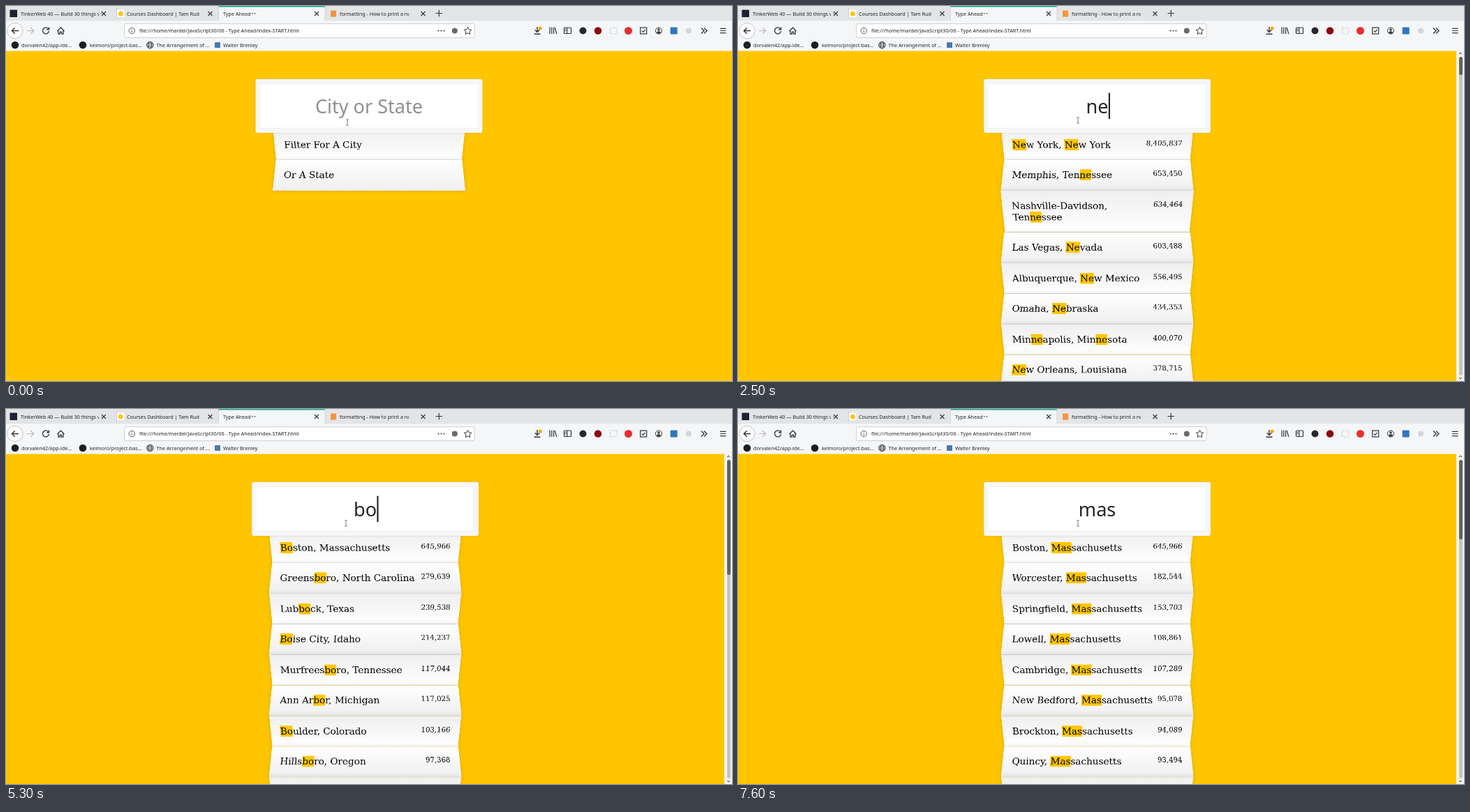
Write an HTML page that moves like this. It is 1040x538 px and loops after 8000 ms.

```html
<!DOCTYPE html>
<html lang="en">
<head>
<meta charset="utf-8">
<title>Type Ahead</title>
<style>
  html, body { margin: 0; width: 100%; height: 100%; overflow: hidden; }
  #stage { position: relative; width: 1040px; height: 538px; overflow: hidden; background: #ffc600; }
  #chrome { position: absolute; left: 0; top: 0; font: 7.22px "Noto Sans", "Open Sans", sans-serif; }

  /* The page is laid out for a 1920px screen and scaled down to the stage. */
  #page { position: absolute; left: 0; top: 64.46px; width: 1920px; transform: scale(.541667); transform-origin: 0 0; }
  #page.scrolls { width: 1900px; }
  .form { position: relative; width: 500px; margin: 62.5px auto; }
  .search {
    position: relative; left: -50px; top: 12.5px; z-index: 2; box-sizing: border-box;
    width: 600px; height: 143px; padding: 25px; border: 12px solid #f7f7f7; border-radius: 6px;
    background: #fff; color: #232629; text-align: center; white-space: nowrap;
    font: 50px/70px "Noto Sans", "Open Sans", sans-serif;
    box-shadow: 0 0 6px rgba(0,0,0,.12), inset 0 0 2.5px rgba(0,0,0,.19);
  }
  .field { position: relative; display: inline-block; }
  .empty { color: #8f9091; }
  #caret { position: absolute; left: 100%; top: 0; width: 4px; height: 69px; background: #232629; }
  .empty + #caret { left: 50%; }
  ul { position: relative; margin: 0; padding: 0; }
  li {
    display: flex; justify-content: space-between; list-style: none; padding: 25px;
    border-bottom: 1px solid #d8d8d8; box-shadow: 0 0 12.5px rgba(0,0,0,.14);
    font: 25px/30px "DejaVu Serif", "Noto Serif", serif; color: #000;
  }
  li:nth-child(odd) {
    transform: perspective(125px) rotateX(-3deg) translateY(3.75px);
    background: linear-gradient(to top, #fff, #efefef);
  }
  li:nth-child(even) {
    transform: perspective(125px) rotateX(3deg) translateY(2.5px) scale(1.001);
    background: linear-gradient(to bottom, #fff, #efefef);
  }
  .population { text-align: right; font-size: 18.75px; line-height: 22px; }
  mark { background: #ffc600; color: inherit; }

  #scrollbar { position: absolute; left: 1029.2px; top: 64.46px; width: 10.8px; height: 474px; background: #f2f3f4; }
  #trough { position: absolute; left: 3.5px; top: 8.5px; width: 5px; height: 457px; border-radius: 2.5px; background: #c3c5c6; }
  #thumb { width: 5px; border-radius: 2.5px; background: #606264; }
  #scrollbar svg { position: absolute; left: 0; top: 0; }
</style>
</head>
<body>
<div id="stage">
  <div id="page">
    <div class="form">
      <div class="search"><span class="field"><span id="query"></span><i id="caret"></i></span></div>
      <ul id="list"></ul>
    </div>
  </div>
  <div id="scrollbar">
    <div id="trough"><div id="thumb"></div></div>
    <svg width="11" height="474" fill="none" stroke="#333"><path d="M4.100 5l1.900-2 1.900 2M4.100 469l1.900 2 1.900-2"/></svg>
  </div>

  <svg id="chrome" width="1040" height="538" fill="none" stroke="#33363a" stroke-width="1.2">
    <defs>
      <linearGradient id="fade"><stop stop-color="#e3e4e6" stop-opacity="0"/><stop offset="1" stop-color="#e3e4e6"/></linearGradient>
      <path id="close" d="M-3-3L3 3M3-3L-3 3"/>
    </defs>
    <g stroke="none">
      <path fill="#f5f6f7" d="M0 0h1040v64.460H0z"/>
      <path fill="#e3e4e6" d="M0 0h1040v21.300H0z"/>
      <path fill="#f5f6f7" d="M304 0h153v22H304z"/>
      <path fill="#16b096" d="M304 0h153v1.500H304z"/>
      <path fill="#c7c8ca" d="M158 3h.8v15h-.8zM304 0h.7v21h-.7zM456.600 0h.7v21h-.7z"/>
    </g>
    <rect x="169.500" y="25.500" width="501.500" height="20" rx="2" fill="#fff" stroke="#c4c6c8" stroke-width=".8"/>

    <g fill="#202326" stroke="none">
      <text x="21" y="13.500">TinkerWeb 40 — Build 30 things w</text>
      <text x="173" y="13.500">Courses Dashboard | Tam Rud</text>
      <text x="311" y="13.500">Type Ahead</text>
      <text x="478" y="13.500">formatting - How to print a numb</text>
      <text x="191" y="38.300">file:///home/mardel/JavaScript30/06 - Type Ahead/index-START.html</text>
      <text x="22" y="58.700">dorvalen42/app-ide...</text>
      <text x="120" y="58.700">kelmoro/project-bas...</text>
      <text x="215.500" y="58.700">The Arrangement of ...</text>
      <text x="311" y="58.700">Walter Brenley</text>
      <circle cx="352.700" cy="10.800" r=".8"/><circle cx="356.500" cy="10.800" r=".8"/>
      <path fill="url(#fade)" d="M119 3h14v16h-14zM577 3h14v16h-14z"/>
      <path fill="#e3e4e6" d="M133 3h3v16h-3zM591 3h2v16h-2z"/>
    </g>

    <!-- site icons -->
    <g stroke="none">
      <rect x="5.500" y="5.500" width="10.500" height="10.500" fill="#1d2230"/>
      <rect x="159" y="5.500" width="10.500" height="10.500" fill="#fff"/>
      <circle cx="164.300" cy="11" r="3.500" fill="#fbc618"/>
      <rect x="465" y="6.500" width="8" height="9" fill="#f0953f"/>
      <circle cx="13" cy="56" r="5.300" fill="#1b1f23"/>
      <circle cx="110" cy="56" r="5.300" fill="#1b1f23"/>
      <rect x="299" y="52" width="8" height="8" rx="1" fill="#4a7aa8"/>
    </g>
    <g stroke-width=".9"><circle cx="206.300" cy="56" r="4.800"/><ellipse cx="206.300" cy="56" rx="2.300" ry="4.800"/><path d="M201.500 56h9.600M202.300 53.500h8M202.300 58.500h8"/></g>

    <use href="#close" x="140" y="11"/><use href="#close" x="292.500" y="11"/>
    <use href="#close" x="445" y="11"/><use href="#close" x="597.500" y="11"/>
    <path d="M615.500 10.500h9.500M620.300 5.800v9.500"/>

    <!-- navigation -->
    <circle cx="13" cy="35.500" r="11.200" fill="#fdfdfd" stroke="#b5b7ba" stroke-width=".8"/>
    <path d="M18 35.500H8.500M12.700 31.200l-4.300 4.300 4.300 4.300" stroke-width="1.400"/>
    <path d="M30 35.500h9.500M35.400 31.200l4.300 4.300-4.300 4.300" stroke="#b4b6b8"/>
    <path d="M60.500 32.500a4.500 4.500 0 1 0 1 3.500M61.600 30.400v3.400h-3.400" stroke-width="1.400"/>
    <path d="M73.500 36l5-5 5 5M75 35.500v4.700h2.400v-3h2.200v3H82v-4.700" stroke-width="1.300"/>
    <g stroke-width=".8"><circle cx="180.300" cy="35.500" r="4.200"/><path d="M180.300 35v2.800M180.300 33v1"/></g>
    <g fill="#45484c" stroke="none">
      <circle cx="619.500" cy="35.500" r="1.100"/><circle cx="623.500" cy="35.500" r="1.100"/><circle cx="627.500" cy="35.500" r="1.100"/>
      <circle cx="642.800" cy="35.500" r="4" fill="#66696d"/>
    </g>
    <path d="M661.500 30.300l1.600 3.400 3.700.5-2.700 2.600.7 3.700-3.300-1.800-3.300 1.800.7-3.700-2.700-2.600 3.700-.5z" stroke-width="1"/>

    <!-- toolbar -->
    <path d="M761 30v7M757.700 34.200l3.300 3.300 3.300-3.300M756.500 40.200h9" stroke-width="1.400"/>
    <circle cx="765.200" cy="32" r="2.500" fill="#f5a800" stroke="none"/>
    <path d="M779 30.500v9.500M781.800 30.500v9.500M784.600 30.500v9.500M786.300 31l2.500 9"/>
    <rect x="799.500" y="31" width="10" height="8.500" rx="1"/><path d="M803.800 31v8.500M800.500 33.500h2M800.500 35.500h2"/>
    <g stroke="none">
      <circle cx="826.500" cy="35.500" r="5" fill="#26282c"/>
      <circle cx="848" cy="35.500" r="5.300" fill="#8b0a12"/>
      <circle cx="891.500" cy="35.500" r="5.500" fill="#e92c30"/>
      <rect x="951.700" y="30.500" width="10" height="10" rx="1" fill="#2f76c0"/>
      <circle cx="978" cy="35.500" r="4" fill="#d3d5d7"/>
    </g>
    <rect x="865.500" y="31" width="9" height="9" stroke="#cfd1d3" stroke-dasharray="3 1.500"/>
    <rect x="908.700" y="31" width="9" height="9"/><path d="M911 35.500l1.700 1.800 3-3.500"/>
    <circle cx="935" cy="35.500" r="4.600" stroke-width="1"/>
    <path d="M932 38.500q0-2.300 3-2.300t3 2.300l-3 1.300zM933.300 34a1.700 1.700 0 1 0 3.400 0 1.700 1.700 0 1 0-3.400 0" fill="#33363a" stroke="none"/>
    <path d="M996 31.500l4 4-4 4M1000 31.500l4 4-4 4" stroke-width="1.400"/>
    <path d="M1023 32.300h8.500M1023 35.500h8.500M1023 38.700h8.500"/>

    <!-- mouse pointer -->
    <path id="pointer" d="M-2-4.300q2 0 2 1V3.300q0 1-2 1M2-4.300q-2 0-2 1M0 3.300q0 1 2 1" stroke="#55585c" stroke-width=".8"/>
  </svg>
</div>

<script>
const cities = `New York, New York:8405837
Los Angeles, California:3884307
Chicago, Illinois:2718782
Houston, Texas:2195914
Philadelphia, Pennsylvania:1553165
Phoenix, Arizona:1513367
San Antonio, Texas:1409019
San Diego, California:1355896
Dallas, Texas:1257676
San Jose, California:998537
Columbus, Ohio:822553
Detroit, Michigan:688701
Memphis, Tennessee:653450
Washington, District Of Columbia:646449
Boston, Massachusetts:645966
Nashville-Davidson, Tennessee:634464
Baltimore, Maryland:622104
Oklahoma City, Oklahoma:610613
Las Vegas, Nevada:603488
Milwaukee, Wisconsin:599164
Albuquerque, New Mexico:556495
Long Beach, California:469428
Virginia Beach, Virginia:448479
Omaha, Nebraska:434353
Minneapolis, Minnesota:400070
Tulsa, Oklahoma:398121
New Orleans, Louisiana:378715
Greensboro, North Carolina:279639
Newark, New Jersey:278427
Buffalo, New York:258959
Jersey City, New Jersey:257342
Madison, Wisconsin:243344
Lubbock, Texas:239538
Boise City, Idaho:214237
Birmingham, Alabama:212113
Rochester, New York:210358
Tacoma, Washington:203446
Yonkers, New York:199766
Worcester, Massachusetts:182544
Springfield, Massachusetts:153703
Murfreesboro, Tennessee:117044
Ann Arbor, Michigan:117025
Lowell, Massachusetts:108861
Cambridge, Massachusetts:107289
Boulder, Colorado:103166
Hillsboro, Oregon:97368
New Bedford, Massachusetts:95078
Brockton, Massachusetts:94089
Quincy, Massachusetts:93494
Lynn, Massachusetts:91589
Bossier City, Louisiana:66333`.split('\n').map(line => line.split(':'));

// Thumb length by query; a query without an entry fits without scrolling.
const thumbLength = { '': 16.5, n: 16.5, ne: 26, new: 72, b: 21, bo: 165, m: 16.5, ma: 37, mas: 114 };

// [start ms, query (null before typing), caret visible]
const timeline = [
  [0, null, false], [400, null, true],
  [1500, 'n', true], [1600, 'ne', true], [1800, 'new', true],
  [2500, 'ne', true], [3100, 'n', true], [3200, '', true],
  [3800, 'b', true], [3900, 'b', false], [4400, 'bo', true], [4600, 'bos', true],
  [5300, 'bo', true], [5500, 'b', true], [6000, '', true], [6300, '', false],
  [6900, 'm', true], [7200, 'ma', true], [7500, 'mas', true], [7600, 'mas', false],
];
const LOOP = 8000;
const $ = id => document.getElementById(id);

function rows(query) {
  if (query === null) return '<li>Filter For A City</li><li>Or A State</li>';
  const pattern = new RegExp(query, 'gi');
  const highlight = name => query ? name.replace(pattern, '<mark>$&</mark>') : name;
  return cities
    .filter(([name]) => name.search(pattern) >= 0)
    .slice(0, 9)
    .map(([name, count]) => `<li><span>${highlight(name)}</span>` +
      `<span class="population">${Number(count).toLocaleString('en-US')}</span></li>`)
    .join('');
}

function show([start, query, caret]) {
  const length = thumbLength[query];
  $('list').innerHTML = rows(query);
  $('query').textContent = query || 'City or State';
  $('query').className = query ? '' : 'empty';
  $('caret').style.display = caret ? '' : 'none';
  $('page').className = length ? 'scrolls' : '';
  $('scrollbar').style.display = length ? '' : 'none';
  $('thumb').style.height = `${length || 0}px`;
  $('pointer').setAttribute('transform', start < 400 ? 'translate(489 167)' : 'translate(487 164)');
}

let current;
function tick() {
  const time = performance.now() % LOOP;
  const state = timeline.findLast(([start]) => start <= time);
  if (state !== current) show(current = state);
  requestAnimationFrame(tick);
}
tick();
</script>
</body>
</html>
```
